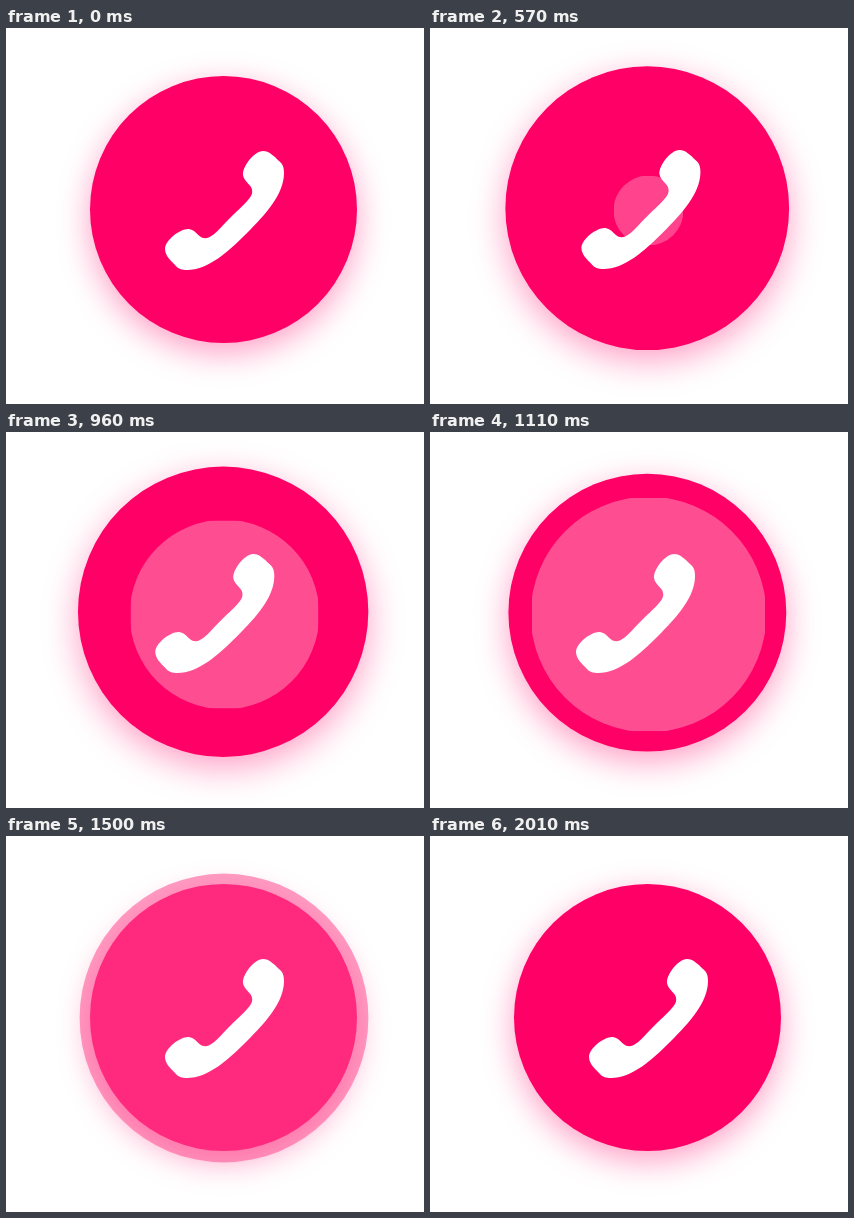
Write an HTML page that moves like this. It is 418 px wide and 376 px high and loops after 2400 ms.

```html
<!DOCTYPE html>
<html lang="en">
<head>
<meta charset="utf-8">
<title>Call button</title>
<style>
  html, body {
    margin: 0;
    width: 100%;
    height: 100%;
    overflow: hidden;
    background: #fff;
  }
  .stage {
    position: relative;
    width: 418px;
    height: 376px;
    overflow: hidden;
  }
  .button {
    position: absolute;
    left: 84px;
    top: 48px;
    width: 267px;
    height: 267px;
    border-radius: 50%;
    background: #f06;
    box-shadow: 0 10px 32px rgba(255, 0, 102, .38);
    transform-origin: 137.5px 153.5px;
  }
  svg {
    position: absolute;
    inset: 0;
  }
  .wave { fill: #ff4d92; }
  .phone { fill: #fff; }
</style>
</head>
<body>
<div class="stage">
  <div class="button" id="button"></div>
  <svg width="418" height="376" viewBox="0 0 418 376">
    <clipPath id="crop"><rect id="cropBox"/></clipPath>
    <circle class="wave" id="ripple" cx="218.5" cy="182.5" r="0" clip-path="url(#crop)"/>
    <circle class="wave" id="burst" cx="218" cy="182" r="0"/>
    <path class="phone" id="phone" d="M257 123
      C263 123 268 128 273 133 C277 136 278 140 278 145
      C278 166 260 186 241 205 C222 224 202 242 181 242
      C176 242 172 241 169 237 C164 232 159 227 159 221
      C159 212 175 200 183 201 C190 202 193 210 198 210
      C205 212 214 200 225 189 C236 178 248 169 246 162
      C246 157 238 154 237 147 C236 139 248 123 257 123Z"/>
  </svg>
</div>
<script>
  const LOOP = 2400, RING_START = 210, RING_END = 1242, BURST_END = 1815;
  const [button, ripple, cropBox, burst, phone] =
    ['button', 'ripple', 'cropBox', 'burst', 'phone'].map(id => document.getElementById(id));

  const progress = (t, from, to) => Math.min(1, Math.max(0, (t - from) / (to - from)));

  function set(el, attrs) {
    for (const name in attrs) el.setAttribute(name, attrs[name]);
  }

  function draw(t) {
    // Button swells, then settles.
    const swell = progress(t, 300, 840) - progress(t, 840, RING_END);
    button.style.transform = `scale(${1 + .125 * swell})`;

    // Handset shakes sideways for six full swings.
    const ringing = t >= RING_START && t < RING_END;
    const dx = ringing ? -13 * Math.sin(2 * Math.PI * (t - RING_START) / 172) : 0;
    set(phone, { transform: `translate(${dx} ${ringing ? -1 : 0})` });

    // Steady inner ripple, with slightly cropped sides.
    const r = t < RING_END ? Math.max(0, .1516 * (t - 343)) : 0;
    set(ripple, { r: r * 1.012, opacity: .75 + .25 * progress(t, 343, 800) });
    set(cropBox, { x: 218.5 - r, y: 182.5 - r, width: 2 * r, height: 2 * r });

    // Fast burst that slows down and fades past the button's edge.
    const age = t - RING_END;
    const bursting = age > 0 && t < BURST_END;
    set(burst, {
      r: bursting ? 168 * (1 - Math.exp(-age / 132)) : 0,
      opacity: 1 - progress(t, RING_END, BURST_END)
    });
  }

  const start = performance.now();
  function tick() {
    draw((performance.now() - start) % LOOP);
    requestAnimationFrame(tick);
  }
  tick();
</script>
</body>
</html>
```
